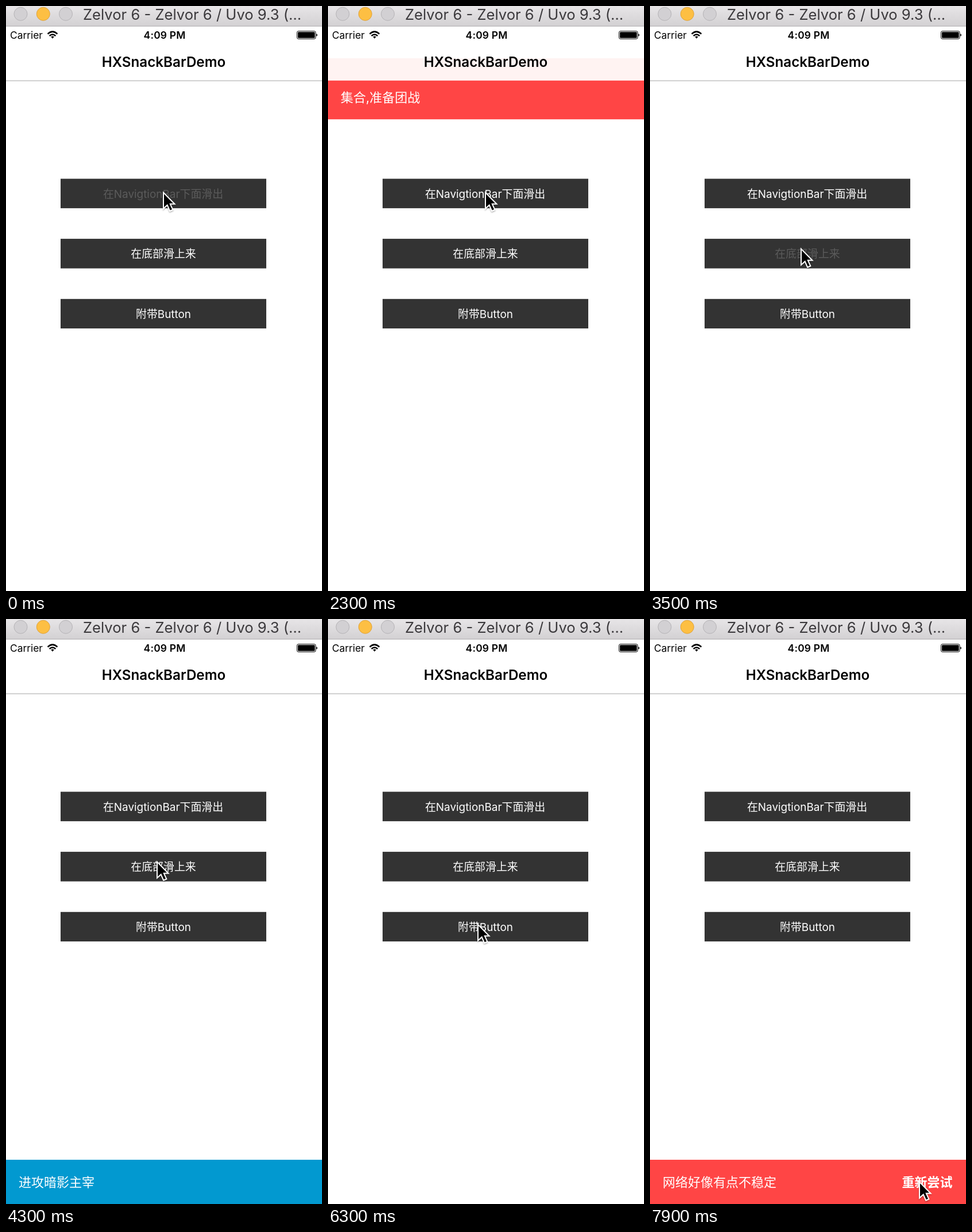
Animation of 550x1018 px, one loop 8 s. Source, as an HTML page:

```html
<!DOCTYPE html>
<html lang="zh-CN">
<head>
<meta charset="utf-8">
<title>HXSnackBarDemo</title>
<style>
html, body { margin: 0; width: 100%; height: 100%; overflow: hidden; background: #fff; }
svg { display: block; width: 550px; height: 1018px; }
text { font-family: Inter, "Noto Sans CJK SC", "Noto Sans CJK", sans-serif; white-space: pre; }
.mid { text-anchor: middle; }
.label { font-size: 18.9px; text-anchor: middle; }
.snack { font-size: 22px; fill: #fff; }
</style>
</head>
<body>
<svg viewBox="0 0 550 1018" xmlns="http://www.w3.org/2000/svg">
  <defs>
    <linearGradient id="chrome" x1="0" y1="0" x2="0" y2="1">
      <stop offset="0" stop-color="#e7e5e7"/>
      <stop offset="1" stop-color="#d3d1d3"/>
    </linearGradient>
    <filter id="shade" x="-50%" y="-50%" width="200%" height="200%">
      <feDropShadow dx="0" dy="1.5" stdDeviation="1.3" flood-opacity=".35"/>
    </filter>
  </defs>
  <rect width="550" height="1018" fill="#fff"/>

  <g fill="#333">
    <rect x="95" y="300.6" width="358" height="51.3"/>
    <rect x="95" y="405.1" width="358" height="51.5"/>
    <rect x="95" y="509.8" width="358" height="51.3"/>
  </g>
  <text class="label" x="273.5" y="333.5">在NavigtionBar下面滑出</text>
  <text class="label" x="274" y="438">在底部滑上来</text>
  <text class="label" x="274" y="542.5">附带Button</text>

  <g id="top">
    <rect y="129" width="550" height="77.3" fill="#ff4545"/>
    <text class="snack" x="22" y="176">集合,准备团战</text>
  </g>
  <g id="blue">
    <rect y="941" width="550" height="78" fill="#0299d0"/>
    <text class="snack" x="22" y="988">进攻暗影主宰</text>
  </g>
  <g id="retry">
    <rect y="941" width="550" height="78" fill="#ff4545"/>
    <text class="snack" x="22" y="988">网络好像有点不稳定</text>
    <text class="snack" x="438.5" y="988" font-weight="700">重新尝试</text>
  </g>

  <rect y="35" width="550" height="94.5" fill="#fff"/>
  <rect id="tint" width="550" fill="#fff3f2"/>
  <rect id="line" y="129.5" width="550" height="1.2" fill="#b2b2b2"/>
  <text class="mid" x="274.4" y="106" font-size="24.2" font-weight="600">HXSnackBarDemo</text>

  <text x="7" y="57" font-size="17.4">Carrier</text>
  <text class="mid" x="276" y="57" font-size="17.4" font-weight="600" letter-spacing=".2">4:09 PM</text>
  <g fill="none" stroke="#000" stroke-width="2.5">
    <path d="M72.6 48.6Q81 40.7 89.4 48.6"/>
    <path d="M75.7 52Q81 47 86.3 52"/>
    <path d="M78.3 53.6Q81 51.2 83.7 53.6L81 56.8Z" fill="#000" stroke="none"/>
  </g>
  <rect x="506.5" y="43.7" width="32.5" height="13.6" rx="2.4" fill="none" stroke="#000" stroke-width="1"/>
  <rect x="508" y="45.2" width="29.5" height="10.6" rx="1.2"/>
  <path d="M540.2 48.2Q542 48.8 542 50.5T540.2 52.8Z"/>

  <rect width="550" height="35" fill="url(#chrome)"/>
  <rect y="34.5" width="550" height="1.2" fill="#b4b2b4"/>
  <g fill="#d2d0d3" stroke="#b5b3b6">
    <circle cx="25.5" cy="13.8" r="11.5"/>
    <circle cx="64.8" cy="13.8" r="11.5" fill="#fdbf43" stroke="#dfa23a"/>
    <circle cx="104" cy="13.8" r="11.5"/>
  </g>
  <text x="134" y="23.5" font-size="25.6" fill="#3b393c">Zelvor 6 - Zelvor 6 / Uvo 9.3 (…</text>

  <path id="cursor" d="M1 2.6V30.5L7.7 24.4L12.2 34.6L17.3 32.4L12.8 22.6H20.5Z" stroke="#fff" stroke-width="2" filter="url(#shade)"/>
</svg>
<script>
const LOOP = 8000, STEP = 100, SLIDE = 300, LEAVE = 275, HEIGHT = 77;
const $ = id => document.getElementById(id);
const labels = document.querySelectorAll('.label');
const clamp = v => Math.max(0, Math.min(1, v));
const ramp = (t, start, length) => clamp((t - start) / length);
const ease = p => p * p * (3 - 2 * p);

// press time, fade-in start
const presses = [[0, 0], [3400, 3500], [6500, 6625]];
// start, end, x, y
const moves = [[2650, 3100, 262, 420], [5900, 6300, 260, 529], [7200, 7900, 468, 977]];

function shown(t, start, end) {
  return ease(ramp(t, start, SLIDE)) - ease(ramp(t, end, LEAVE));
}

function place(id, part, dir) {
  $(id).setAttribute('transform', `translate(0 ${dir * HEIGHT * (1 - part)})`);
  $(id).style.display = part > 0 ? '' : 'none';
}

function drawTop(part) {
  place('top', part, -1);
  const hidden = HEIGHT * (1 - part);
  const under = part > 0 && hidden > 0.5;
  const y = Math.max(36, 100 - hidden);
  $('tint').setAttribute('y', y);
  $('tint').setAttribute('height', 129.5 - y);
  $('tint').style.display = under ? '' : 'none';
  $('line').style.display = part > 0 ? 'none' : '';
}

function drawLabels(t) {
  presses.forEach(([down, up], i) => {
    const light = t < down ? 1 : ramp(t, up, 400);
    const c = Math.round(91 + 164 * light);
    labels[i].setAttribute('fill', `rgb(${c},${c},${c})`);
  });
}

function drawCursor(t) {
  let x = 273, y = 322;
  for (const [start, end, toX, toY] of moves) {
    const p = ease(ramp(t, start, end - start));
    x += (toX - x) * p;
    y += (toY - y) * p;
  }
  $('cursor').setAttribute('transform', `translate(${x} ${y})`);
}

function draw(t) {
  drawTop(shown(t, 0, 2241));
  place('blue', shown(t, 3500, 5693), 1);
  place('retry', shown(t, 6620, LOOP), 1);
  drawLabels(t);
  drawCursor(t);
}

const began = performance.now();
function tick() {
  const t = (performance.now() - began) % LOOP;
  draw(Math.floor(t / STEP) * STEP);
  requestAnimationFrame(tick);
}
draw(0);
requestAnimationFrame(tick);
</script>
</body>
</html>
```
